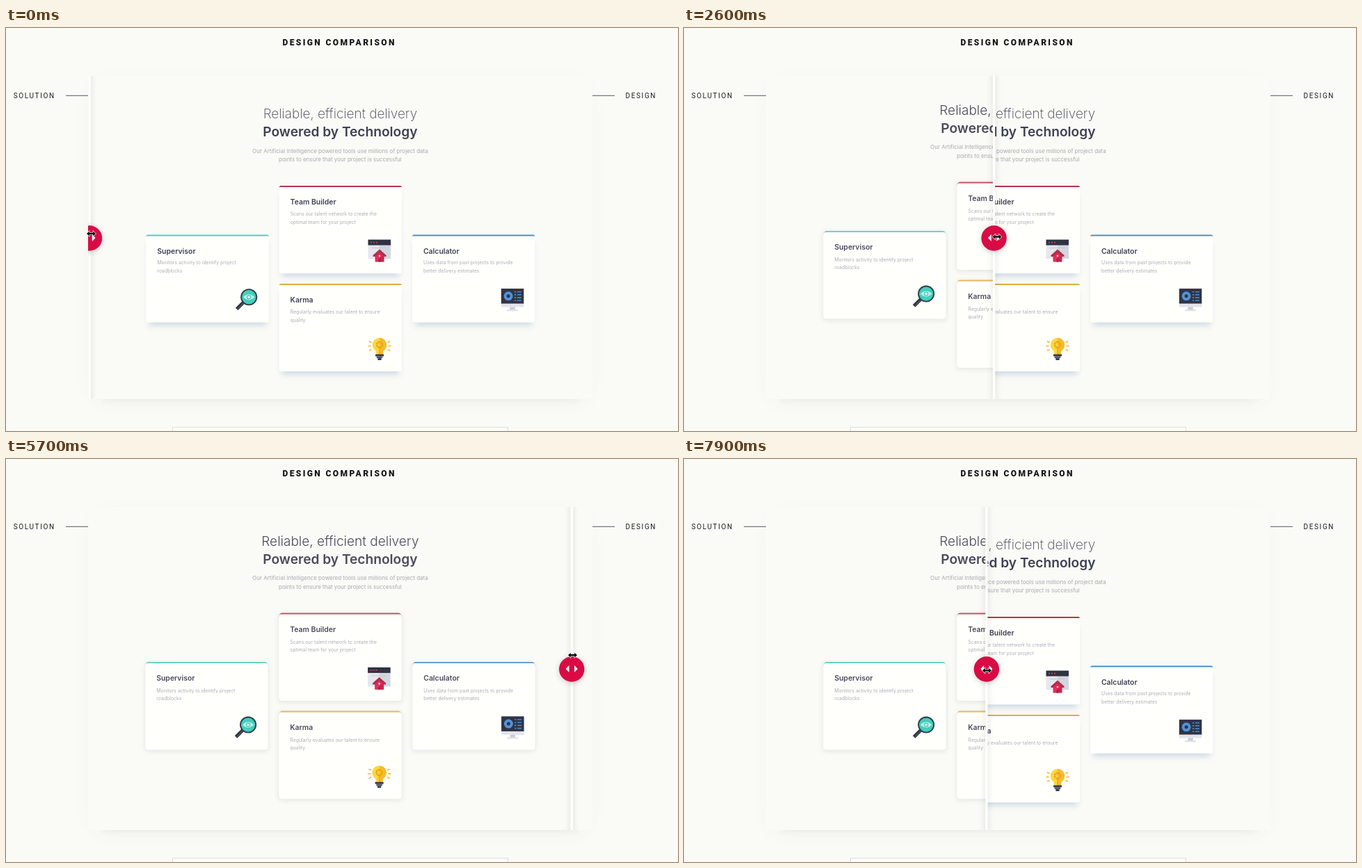
Write an HTML page that moves like this. It is 966x580 px and loops after 8 s.

```html
<!DOCTYPE html>
<html lang="en">
<head>
<meta charset="utf-8">
<title>Design comparison</title>
<style>
  html, body { margin: 0; width: 100%; height: 100%; overflow: hidden; background: #fafaf6; }
  svg { display: block; }
  text { font-family: Inter, sans-serif; font-optical-sizing: none; }
  .label { font: 400 10px Roboto, sans-serif; letter-spacing: 1.6px; fill: #1d1d20; }
  .title { font: 900 12px Roboto, sans-serif; letter-spacing: 2.4px; fill: #161618; }
  .mid { text-anchor: middle; }
  .strong { font-size: 19.15px; font-weight: 600; }
  .lead { font-size: 8px; fill: #a9aab4; }
  .name { font-size: 10.45px; font-weight: 600; }
  .note { font-size: 6.9px; fill: #adaeb8; }
  .soft { filter: blur(4px); }
</style>
</head>
<body>
<svg width="966" height="580" viewBox="0 0 966 580">
  <defs id="icons">
    <clipPath id="frame"><rect x="118" y="69" width="725" height="465"/></clipPath>
    <clipPath id="reveal"><rect id="revealBox" x="118" y="69" width="0" height="465"/></clipPath>
  </defs>

  <rect x="126" y="82" width="709" height="455" rx="20" fill="#5a5a50" opacity=".05" style="filter:blur(16px)"/>
  <rect x="140" y="500" width="682" height="37" fill="#5a5a50" opacity=".05" class="soft"/>
  <rect x="118" y="69" width="725" height="465" fill="#fafaf6"/>
  <rect x="239.5" y="574.5" width="482" height="20" fill="#fefefb" stroke="#dedfdc"/>

  <text class="title" x="397.5" y="25">DESIGN COMPARISON</text>
  <text class="label" x="10.8" y="101">SOLUTION</text>
  <text class="label" x="890.6" y="101">DESIGN</text>
  <path d="M86 97.4H118.5M843 97.4H875" stroke="#77777a" stroke-width="1.4"/>

  <g clip-path="url(#frame)">
    <g id="design"></g>
    <g clip-path="url(#reveal)">
      <rect x="118" y="69" width="725" height="465" fill="#fafaf6"/>
      <g id="solution"></g>
    </g>
    <g id="slider">
      <rect x="-3" y="60" width="6" height="484" opacity=".1" class="soft"/>
      <rect x="-1.6" y="69" width="3.2" height="465" fill="#fffffd"/>
      <circle cy="304" r="18" opacity=".2" class="soft"/>
      <circle cy="302.5" r="18.2" fill="#d90b45"/>
      <path d="M-8.6 302 -3.8 297V307ZM8.6 302 3.8 297V307Z" fill="#fff"/>
    </g>
  </g>
  <path id="cursor" d="M-6.5 0-2.8-3.6V-1.2H2.8V-3.6L6.5 0 2.8 3.6V1.2H-2.8V3.6Z"
        fill="#0b0b0d" stroke="#fff" stroke-width="1.2" paint-order="stroke"/>
</svg>

<script>
const $ = id => document.getElementById(id);
const box = (x, y, w, h, fill) => `<rect x="${x}" y="${y}" width="${w}" height="${h}" fill="${fill}"/>`;
const disc = (x, y, r, fill) => `<circle cx="${x}" cy="${y}" r="${r}" fill="${fill}"/>`;
const ring = (x, y, r, color, width, dash = 'none') =>
  `<circle cx="${x}" cy="${y}" r="${r}" fill="none" stroke="${color}" stroke-width="${width}" stroke-dasharray="${dash}"/>`;
const line = (d, color, width, dash = 'none') =>
  `<path d="${d}" stroke="${color}" stroke-width="${width}" stroke-dasharray="${dash}"/>`;
const each = (n, f) => Array.from({ length: n }, (_, i) => f(i)).join('');

const ICONS = {
  lens: line('M12 20 2.5 29.5', '#2f3440', 5) + line('M13 20 4 29', '#566070', 1.2)
    + disc(20, 12.2, 12, '#2f3a47') + disc(20, 12.2, 10.2, '#41cfbc')
    + '<path d="M12 12.2Q20 4 28 12.2 20 20.4 12 12.2Z" fill="#c9f1ea"/>'
    + disc(20, 12.2, 3.4, '#5bd2c1') + disc(20, 12.2, 1.6, '#effbf8'),
  house: box(0, 0, 16.5, 27.5, '#e6e6ed') + box(16.5, 0, 16, 27.5, '#d3d5df') + box(0, 0, 32.5, 8, '#2f3241')
    + line('M3.5 4H14', '#c8405c', 1.8, '2') + line('M5 12H27', '#c4c7d3', 1)
    + box(10, 21, 6.5, 11, '#e22f5d') + box(16.5, 21, 6.5, 11, '#cb2450')
    + '<path d="M7 24.5V22.5L16.5 14 26 22.5V24.5H7Z" fill="#b02f4b"/>'
    + '<path d="M10 24.5 16.5 18.5 23 24.5Z" fill="#dc2c58"/>'
    + box(15, 27.5, 3, 4.5, '#a32343') + disc(16.5, 23.5, 1.3, '#f3d5dd'),
  bulb: each(6, i => {
    const turn = (i % 3 - 1) * 24 + (i > 2 ? 180 : 0);
    return `<g transform="rotate(${turn} 16.5 12)">${line('M29 12H33', '#f3b93a', 1.7)}</g>`;
  })
    + '<path d="M16.5.5A10 10 0 0 0 11 19L12 24.5H21L22 19A10 10 0 0 0 16.5.5Z" fill="#fbd83b"/>'
    + '<path d="M16.5.5A10 10 0 0 1 22 19L21 24.5H16.5Z" fill="#f5bd2c"/>'
    + ring(16.5, 10.3, 4, '#eea31f', 2.6, '2.6 .6') + line('M16.5 14V24', '#e9a325', 1.4)
    + each(3, i => box(10.5 + 1.7 * i, 24 + 2.8 * i, 12 - 3.4 * i, 2.8, i === 1 ? '#565a68' : '#33364a')),
  monitor: box(0, 0, 32.5, 22, '#303443') + box(0, 21.5, 32.5, 5, '#e3e4ec')
    + box(12.5, 26.5, 7.5, 4, '#c9ccd8') + box(8.5, 30, 15.5, 2.3, '#dfe0e8')
    + ring(10.3, 10.7, 4.5, '#5093dc', 4)
    + each(4, i => line(`M19 ${4.6 + 4.2 * i}h10`, '#4787cd', 1.6, '2.5 1.5 6'))
};
$('icons').innerHTML += Object.entries(ICONS).map(([id, art]) => `<g id="${id}">${art}</g>`).join('');

const CARDS = [
  { name: 'Supervisor', note: ['Monitors activity to identify project', 'roadblocks'], icon: 'lens', tint: '#4dcfbd', col: 0, row: 1 },
  { name: 'Team Builder', note: ['Scans our talent network to create the', 'optimal team for your project'], icon: 'house', tint: '#b93249', col: 1, row: 0 },
  { name: 'Karma', note: ['Regularly evaluates our talent to ensure', 'quality'], icon: 'bulb', tint: '#deae42', col: 1, row: 2 },
  { name: 'Calculator', note: ['Uses data from past projects to provide', 'better delivery estimates'], icon: 'monitor', tint: '#4a8fcd', col: 2, row: 1 }
];
const W = 176.3, H = 126.3;

const DESIGN = {
  head: 130.3, thin: 200, ink: '#3f4053', left: 201.4, top: 227, pitch: 191.3,
  radius: 2.5, arc: 0, vivid: 1, noteY: 42.8, leading: 11.7, iconY: 77.6,
  shadow: { inset: 4, dy: 8, fill: '#8fa9c8', opacity: .42 }
};
const SOLUTION = {
  head: 124.8, thin: 300, ink: '#4b4a5c', left: 200.3, top: 221.6, pitch: 192,
  radius: 5, arc: 3, vivid: .82, noteY: 44.2, leading: 11, iconY: 78.3,
  shadow: { inset: 0, dy: 2, fill: '#000', opacity: .09 }
};

function card(look, { name, note, icon, tint, col, row }) {
  const { radius: r, arc, shadow: s } = look;
  return `<g transform="translate(${look.left + col * look.pitch} ${look.top + row * 70.5})">
    <rect x="${s.inset}" y="${s.inset + s.dy}" width="${W - 2 * s.inset}" height="${H - 2 * s.inset}"
      fill="${s.fill}" opacity="${s.opacity}" class="soft"/>
    <path d="M0 ${r + .5}V${r}A${r} ${r} 0 0 1 ${r} 0H${W - r}A${r} ${r} 0 0 1 ${W} ${r}V${r + .5}Z"
      fill="${tint}" opacity="${look.vivid}"/>
    <path d="M0 ${2 + arc}Q0 2 ${arc} 2H${W - arc}Q${W} 2 ${W} ${2 + arc}
      V${H - r}Q${W} ${H} ${W - r} ${H}H${r}Q0 ${H} 0 ${H - r}Z" fill="#fffffc"/>
    <text class="name" x="15.9" y="27.1" fill="${look.ink}">${name}</text>
    ${note.map((words, n) => `<text class="note" x="16" y="${look.noteY + n * look.leading}">${words}</text>`).join('')}
    <use href="#${icon}" x="127.8" y="${look.iconY}"/>
  </g>`;
}

function page(look) {
  const mid = (dy, kind, words) => `<text class="mid ${kind}" x="480.4" y="${look.head + dy}">${words}</text>`;
  return `<g fill="${look.ink}" font-size="19" font-weight="${look.thin}">
    ${mid(0, '', 'Reliable, efficient delivery')}
    ${mid(25.8, 'strong', 'Powered by Technology')}</g><g>
    ${mid(49.3, 'lead', 'Our Artificial Intelligence powered tools use millions of project data')}
    ${mid(61.8, 'lead', 'points to ensure that your project is successful')}</g>`
    + CARDS.map(c => card(look, c)).join('');
}

$('design').innerHTML = page(DESIGN);
$('solution').innerHTML = page(SOLUTION);

// pointer stops: time, x, y
const STOPS = [
  [0, 122.5, 296], [400, 122.5, 296], [480, 125.5, 297], [850, 125.5, 298],
  [1600, 273, 306], [1700, 277, 306], [2600, 450, 300.5], [3600, 628, 288],
  [4600, 817, 277], [4900, 852, 280], [5400, 852, 280], [6400, 727, 287.5], [8000, 416, 305.5]
];
const LOOP = 8000, STEP = 100, LAG = 10, GRIP = 2.5;

function pointer(t) {
  const i = Math.max(1, STOPS.findIndex(s => s[0] >= t));
  const [t0, x0, y0] = STOPS[i - 1], [t1, x1, y1] = STOPS[i];
  const k = Math.max(0, (t - t0) / (t1 - t0));
  return [x0 + (x1 - x0) * k, y0 + (y1 - y0) * k];
}

// the handle trails the pointer and stays inside the frame
function draw(now) {
  const t = Math.floor((now % LOOP) / STEP) * STEP;
  const x = Math.min(841.5, Math.max(119.5, pointer(t - LAG)[0] - GRIP));
  $('revealBox').setAttribute('width', x - 118);
  $('slider').setAttribute('transform', `translate(${x} 0)`);
  $('cursor').setAttribute('transform', `translate(${pointer(t)})`);
}

const start = performance.now();
function tick() {
  draw(performance.now() - start);
  requestAnimationFrame(tick);
}
tick();
</script>
</body>
</html>
```
